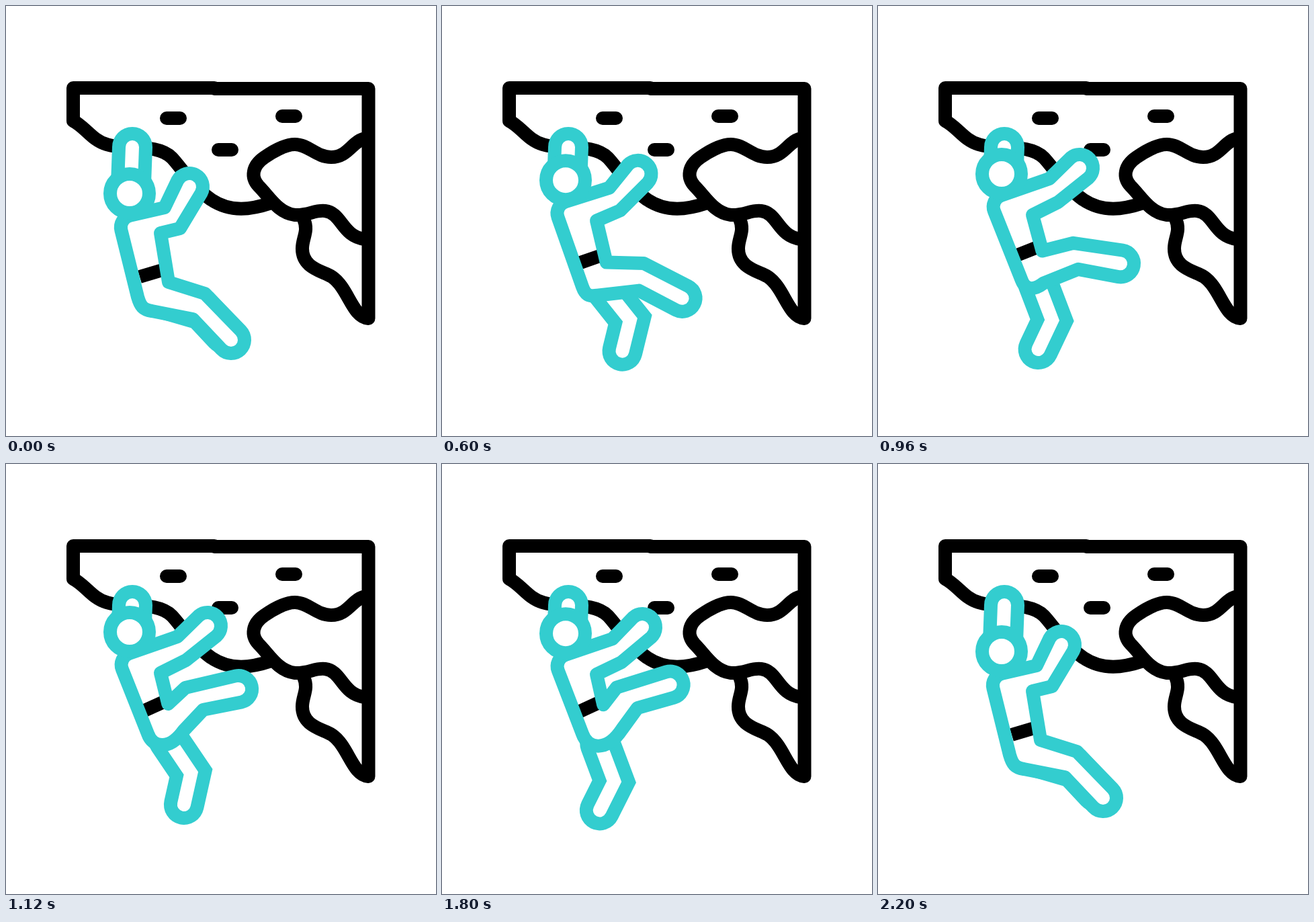
An HTML page with a canvas for the animation above (2.4 s loop, 640 by 640 pixels).

```html
<!DOCTYPE html>
<html lang="en">
<head>
<meta charset="utf-8">
<title>Climber</title>
<style>
html, body { margin: 0; height: 100%; overflow: hidden; background: #fff; }
canvas { display: block; width: 640px; height: 640px; }
</style>
</head>
<body>
<canvas id="stage" width="640" height="640"></canvas>
<script>
const ctx = document.getElementById('stage').getContext('2d');
const TEAL = '#33cdcf', LOOP = 2400, STEP = 20, RAD = Math.PI / 180;

const rock = new Path2D(`
  M395 293 C365 303 335 308 305 288 C277 268 262 242 247 226
  C224 203 180 216 150 206 C128 200 118 180 100 171 V122 H310 V123 H539.5 V465
  C515 463 510 420 485 403 C470 394 441 390 441 361 C441 345 451 335 443 317
  M536 197 C515 200 510 225 484 225 C462 225 450 206 430 206
  C415 206 395 218 385 225 C366 238 364 255 376 268
  C392 284 405 308 430 311 C450 312 460 303 475 305 C500 308 500 343 534 347
  M239 167 H259 M411 164 H431 M316 214 H336`);
const gripArm = new Path2D('M166 265 L168 210 A20 20 0 0 1 208 210 L206 265');

// Points of each pose; the upper body is shared by both raised poses.
const hang = {
  head: [184, 279], shoulder: [167, 316], elbow: [236, 300], hand: [273, 269],
  pitOut: [259, 331], pit: [230, 338], crotch: [242, 411], kneeTop: [296, 428],
  foot: [335, 497], kneeLow: [278, 466], seat: [217, 454], seatIn: [204, 452],
  hipIn: [200, 447], hip: [196, 433], beltL: [199, 403], beltR: [236, 392]
};
const raised = {
  head: [184, 250], shoulder: [166, 288], elbow: [255, 257], hand: [300, 241],
  pitOut: [268, 292], pit: [230, 311], crotch: [246, 368], kneeTop: [302, 362],
  foot: [368, 406], kneeLow: [300, 404], seat: [238, 420], seatIn: [224, 424],
  hipIn: [219, 421], hip: [215, 411], beltL: [204, 374], beltR: [242, 360]
};
const folded = {
  ...raised, crotch: [240, 354], kneeTop: [257, 325], foot: [340, 315],
  kneeLow: [292, 355], seat: [272, 390], seatIn: [248, 428],
  hipIn: [218, 422], hip: [210, 399], beltL: [200, 368], beltR: [238, 350]
};

// Keys: time, values
const rise = [[200, 0], [840, 1], [1720, 1], [2200, 0]];
const fold = [[820, 0], [1250, 1]];
// hip x, hip y, thigh angle, shin angle
const backLeg = [
  [200, 234, 436, 16, 47], [380, 249, 430, 22, 73], [820, 236, 413, 75, 121],
  [1280, 244, 410, 48.6, 95.5], [1720, 233, 414, 76, 121],
  [2061, 249, 430, 22, 73], [2200, 234, 436, 16, 47]
];

// Smooth monotone interpolation through the keys
function track(keys, t) {
  const last = keys.length - 1;
  if (t <= keys[0][0]) return keys[0].slice(1);
  if (t >= keys[last][0]) return keys[last].slice(1);
  const i = keys.findIndex(k => k[0] > t) - 1;
  const a = keys[i], b = keys[i + 1], span = b[0] - a[0], u = (t - a[0]) / span;
  const slope = (j, c) => (keys[j + 1][c] - keys[j][c]) / (keys[j + 1][0] - keys[j][0]);
  const tangent = (j, c) => {
    if (j === 0 || j === last) return 0;
    const s = slope(j - 1, c), e = slope(j, c);
    return s * e > 0 ? 2 * s * e / (s + e) : 0;
  };
  return a.slice(1).map((v, n) => {
    const c = n + 1;
    return v + (b[c] - v) * u * u * (3 - 2 * u)
      + span * u * (1 - u) * (tangent(i, c) * (1 - u) - tangent(i + 1, c) * u);
  });
}

function mix(a, b, k) {
  const out = {};
  for (const n in a) out[n] = a[n].map((v, i) => v + (b[n][i] - v) * k);
  return out;
}

function stroke(color, width, path) {
  ctx.strokeStyle = color;
  ctx.lineWidth = width;
  path ? ctx.stroke(path) : ctx.stroke();
}

const line = p => ctx.lineTo(...p);

// Half circle around a limb's end, facing away from its joint
function limbEnd(end, j1, j2) {
  const a = Math.atan2(end[1] - (j1[1] + j2[1]) / 2, end[0] - (j1[0] + j2[0]) / 2);
  ctx.arc(...end, 20, a - Math.PI / 2, a + Math.PI / 2);
}

function drawBackLeg(t) {
  const [x, y, thigh, shin] = track(backLeg, t);
  const kx = x + 60 * Math.cos(thigh * RAD), ky = y + 60 * Math.sin(thigh * RAD);
  ctx.lineJoin = 'miter';
  ctx.beginPath();
  line([x, y]);
  line([kx, ky]);
  line([kx + 48 * Math.cos(shin * RAD), ky + 48 * Math.sin(shin * RAD)]);
  stroke(TEAL, 60);
  stroke('#fff', 20);
  ctx.lineJoin = 'round';
}

function drawBody(p) {
  const body = () => {
    ctx.beginPath();
    ctx.moveTo(...p.hip);
    ctx.arcTo(...p.shoulder, ...p.elbow, 18);
    line(p.elbow);
    limbEnd(p.hand, p.elbow, p.pitOut);
    [p.pitOut, p.pit, p.crotch, p.kneeTop].forEach(line);
    limbEnd(p.foot, p.kneeTop, p.kneeLow);
    line(p.kneeLow);
    line(p.seat);
    ctx.bezierCurveTo(...p.seatIn, ...p.hipIn, ...p.hip);
    ctx.closePath();
  };
  ctx.fillStyle = '#fff';
  body();
  ctx.fill();

  ctx.lineCap = 'butt';
  ctx.beginPath();
  line(p.beltL);
  line(p.beltR);
  stroke('#000', 20);
  ctx.lineCap = 'round';

  body();
  stroke(TEAL, 20);

  ctx.beginPath();
  ctx.arc(...p.head, 29, 0, 2 * Math.PI);
  ctx.fill();
  stroke(TEAL, 20);
}

function draw(now) {
  const t = Math.floor((now % LOOP) / STEP) * STEP;
  const pose = mix(hang, mix(raised, folded, track(fold, t)[0]), track(rise, t)[0]);
  ctx.fillStyle = '#fff';
  ctx.fillRect(0, 0, 640, 640);
  ctx.lineCap = ctx.lineJoin = 'round';
  stroke('#000', 20, rock);
  ctx.fillStyle = '#fff';
  ctx.fill(gripArm);
  stroke(TEAL, 20, gripArm);
  drawBackLeg(t);
  drawBody(pose);
}

const start = performance.now();
function tick() {
  draw(performance.now() - start);
  requestAnimationFrame(tick);
}
tick();
</script>
</body>
</html>
```
